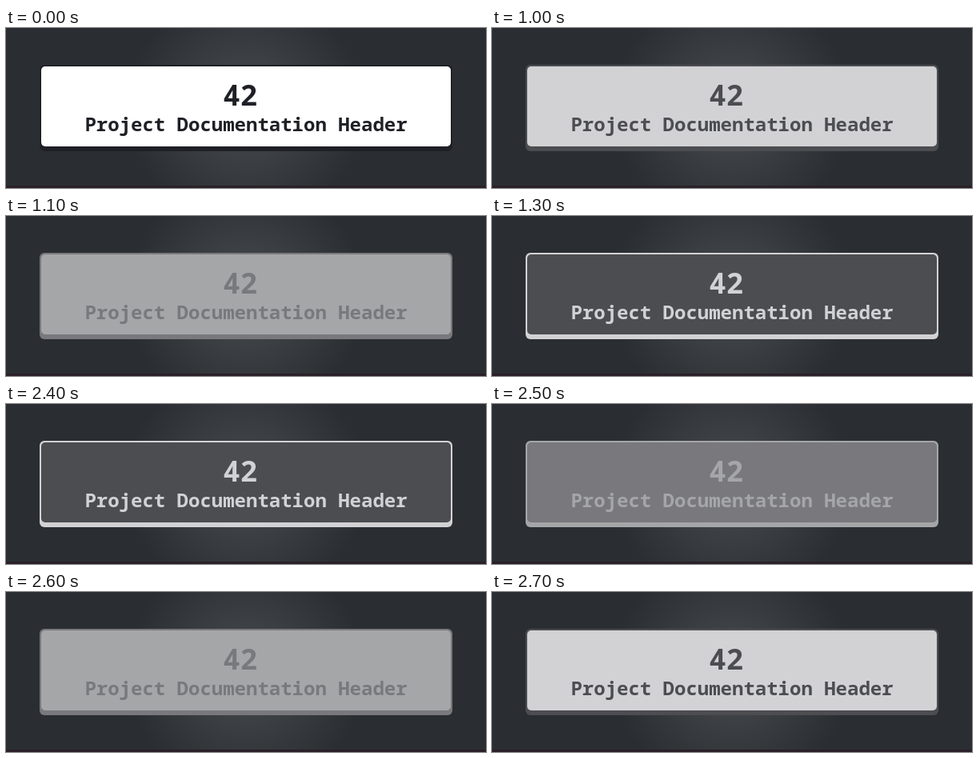
Write an HTML page that moves like this. It is 600 px wide and 200 px high and loops after 2800 ms.

```html
<!DOCTYPE html>
<html lang="en">
<head>
<meta charset="utf-8">
<title>Project Documentation Header</title>
<style>
  html, body { margin: 0; width: 100%; height: 100%; overflow: hidden; background: #2a2e32; }
  svg { display: block; width: 600px; height: 200px; }
  text { font-family: "JetBrains Mono", "Noto Sans Mono", "DejaVu Sans Mono", monospace; font-weight: 700; }
  .ink { fill: var(--ink); }
  .paper { fill: var(--paper); }
</style>
</head>
<body>
<svg viewBox="0 0 600 200">
  <defs>
    <radialGradient id="glow" gradientUnits="userSpaceOnUse" cx="300" cy="100" r="150">
      <stop offset="0" stop-color="#494c50"/>
      <stop offset="1" stop-color="#2a2e32"/>
    </radialGradient>
  </defs>
  <rect width="600" height="200" fill="url(#glow)"/>
  <rect y="197" width="600" height="3" fill="#2b2028"/>
  <rect class="ink" x="42" y="46" width="516" height="108" rx="6"/>
  <rect class="paper" x="44" y="48" width="512" height="100" rx="5"/>
  <text class="ink" x="271.2" y="97" font-size="36">42</text>
  <text class="ink" x="300" y="128.5" font-size="24" text-anchor="middle">Project Documentation Header</text>
</svg>
<script>
const LOOP = 2800, HOLD = 1000, STEP = 100, STEPS = 5;
const DARK = [31, 32, 38], LIGHT = [255, 255, 255];
const root = document.documentElement.style;

const mix = (from, to, amount) =>
  `rgb(${from.map((v, i) => Math.round(v + (to[i] - v) * amount)).join(",")})`;

// 0 = light panel, 1 = dark panel; the fade moves in fifths.
function darkness(time) {
  const half = LOOP / 2;
  if (time < HOLD) return 0;
  if (time < half) return (Math.floor((time - HOLD) / STEP) + 1) / STEPS;
  if (time < half + HOLD) return 1;
  return 1 - (Math.floor((time - half - HOLD) / STEP) + 1) / STEPS;
}

function draw() {
  const amount = darkness(performance.now() % LOOP);
  root.setProperty("--ink", mix(DARK, LIGHT, amount));
  root.setProperty("--paper", mix(LIGHT, DARK, amount));
  requestAnimationFrame(draw);
}
draw();
</script>
</body>
</html>
```
